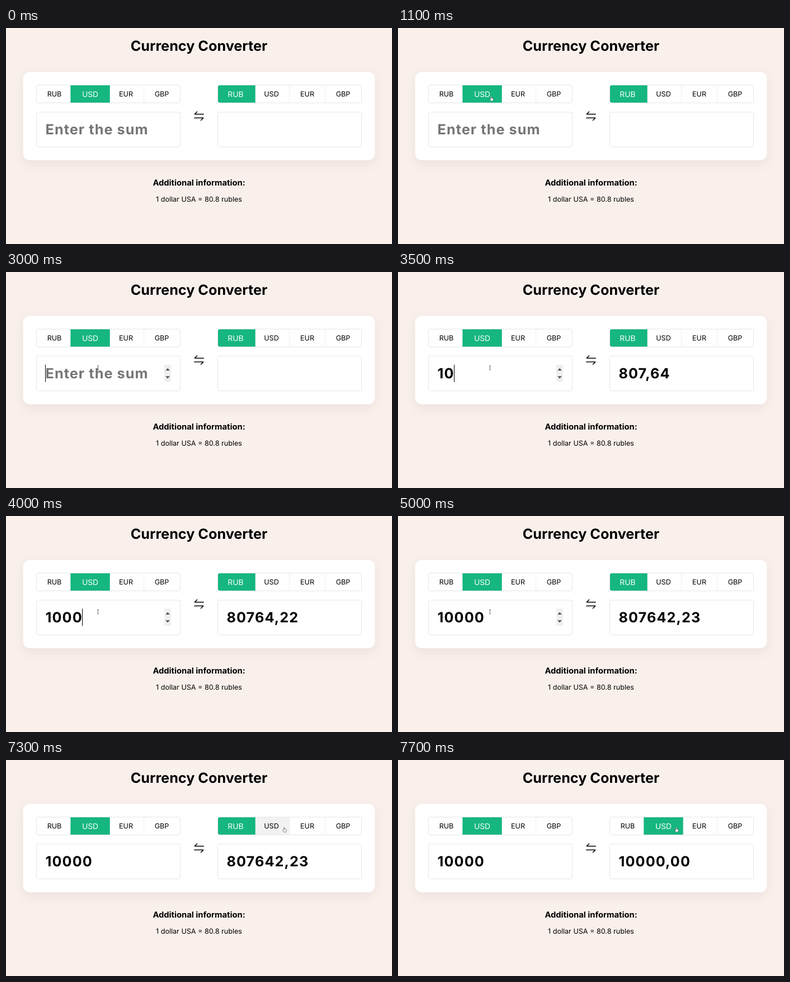
Write an HTML page with a canvas that moves like this. It is 690x388 px and loops after 8000 ms.

```html
<!DOCTYPE html>
<html lang="en">
<head>
<meta charset="utf-8">
<title>Currency Converter</title>
<style>
  html, body { margin: 0; width: 100%; height: 100%; overflow: hidden; background: #f9f0ec; }
  canvas { display: block; width: 690px; height: 388px; }
</style>
</head>
<body>
<canvas id="stage"></canvas>
<script>
const W = 690, H = 388, LOOP = 8000, STEP = 100;
const canvas = document.getElementById('stage');
const ctx = canvas.getContext('2d');
const ratio = window.devicePixelRatio || 1;
canvas.width = W * ratio;
canvas.height = H * ratio;

const GREEN = '#16b67f', BORDER = '#e6e6e6', DIVIDER = '#eeeeee';
const CODES = ['RUB', 'USD', 'EUR', 'GBP'];
const PANEL_W = 257, TAB_W = 64, TAB_Y = 102.5, TAB_H = 32;
const FIELD_Y = 151, FIELD_H = 62.5;
const LEFT = 54.5, RIGHT = 378.5;
const BODY = 12.6, BIG = 25.2, SUM_SPACING = 1.1, SUM_PAD = 16;
const CLICK = 7300;

// time, typed sum, converted sum
const ENTRIES = [
  [0, '', ''],
  [3100, '1', '80,76'],
  [3500, '10', '807,64'],
  [3700, '100', '8076,42'],
  [4000, '1000', '80764,22'],
  [4500, '10000', '807642,23'],
  [7400, '10000', '10000,00']
];

// time, x, y of the pointer
const PATH = [
  [300, 172.5, 106.5], [1000, 172.5, 106.5], [1100, 167.2, 126.8], [1300, 164, 147],
  [1600, 162, 178], [1800, 162, 178], [2200, 164.5, 172], [5400, 164.5, 172],
  [5700, 161, 164.5], [5900, 161, 164.5], [6600, 490, 124], [6800, 490, 124],
  [7200, 498, 125]
];

const clamp = v => Math.max(0, Math.min(1, v));
const smooth = v => v * v * (3 - 2 * v);

function box(x, y, w, h, r) {
  ctx.beginPath();
  ctx.roundRect(x, y, w, h, r);
}

function poly(points, close) {
  ctx.beginPath();
  points.forEach(([x, y]) => ctx.lineTo(x, y));
  if (close) ctx.closePath();
}

function setFont(size, weight, spacing = 0) {
  ctx.font = `${weight} ${size}px Inter, sans-serif`;
  ctx.letterSpacing = spacing + 'px';
}

function write(str, x, y, size, weight, color) {
  setFont(size, weight);
  ctx.textAlign = 'center';
  ctx.fillStyle = color;
  ctx.fillText(str, x, y);
}

function writeSum(str, x, color) {
  setFont(BIG, 700, SUM_SPACING);
  ctx.textAlign = 'left';
  ctx.fillStyle = color;
  ctx.fillText(str, x + SUM_PAD, 191.2);
}

function pointerAt(t) {
  if (t < PATH[0][0]) return null;
  const i = PATH.findIndex(p => p[0] > t);
  if (i < 0) return PATH[PATH.length - 1].slice(1);
  const [t0, x0, y0] = PATH[i - 1], [t1, x1, y1] = PATH[i];
  const k = (t - t0) / (t1 - t0);
  return [x0 + (x1 - x0) * k, y0 + (y1 - y0) * k];
}

function inside(p, x, y, w, h) {
  return !!p && p[0] >= x && p[0] < x + w && p[1] >= y && p[1] < y + h;
}

function drawCard() {
  ctx.fillStyle = '#f9f0ec';
  ctx.fillRect(0, 0, W, H);
  ctx.save();
  ctx.shadowColor = 'rgba(90, 50, 30, 0.08)';
  ctx.shadowBlur = 20 * ratio;
  ctx.shadowOffsetY = 6 * ratio;
  ctx.fillStyle = '#fff';
  box(30.5, 79, 629, 158.5, 12);
  ctx.fill();
  ctx.restore();
}

// levels: how far each tab is selected, 0 to 1
function drawTabs(x, levels, pointer) {
  ctx.strokeStyle = BORDER;
  ctx.lineWidth = 1;
  box(x, TAB_Y, PANEL_W, TAB_H, 3.5);
  ctx.stroke();

  ctx.save();
  box(x + 0.5, TAB_Y + 0.5, PANEL_W - 1, TAB_H - 1, 3);
  ctx.clip();
  const order = [0, 1, 2, 3].sort((a, b) => levels[a] - levels[b]);
  for (const i of order) {
    const left = x + i * TAB_W, level = levels[i];
    if (i) {
      ctx.fillStyle = DIVIDER;
      ctx.fillRect(left - 0.5, TAB_Y, 1, TAB_H);
    }
    ctx.save();
    ctx.translate(left + TAB_W / 2, TAB_Y + TAB_H / 2);
    ctx.scale(1 + level * 0.1, 1 + level * 0.1);
    if (inside(pointer, left, TAB_Y, TAB_W, TAB_H) && level < 1) {
      ctx.fillStyle = '#f2f2f2';
      ctx.fillRect(-TAB_W / 2, -TAB_H / 2, TAB_W, TAB_H);
    }
    ctx.globalAlpha = level;
    ctx.fillStyle = GREEN;
    ctx.fillRect(-TAB_W / 2, -TAB_H / 2, TAB_W, TAB_H);
    ctx.globalAlpha = 1;
    const c = Math.round(255 * level);
    write(CODES[i], 0, 4.8, BODY, 400, `rgb(${c}, ${c}, ${c})`);
    ctx.restore();
  }
  ctx.restore();
}

function drawField(x) {
  ctx.strokeStyle = BORDER;
  ctx.lineWidth = 1;
  box(x, FIELD_Y, PANEL_W, FIELD_H, 3.5);
  ctx.stroke();
}

function drawSpinner() {
  ctx.fillStyle = '#efefef';
  ctx.fillRect(283, 166.5, 12, 30.5);
  ctx.fillStyle = '#505050';
  poly([[285.2, 177], [289, 172.8], [292.8, 177]], true);
  ctx.fill();
  poly([[285.2, 187.3], [289, 191.5], [292.8, 187.3]], true);
  ctx.fill();
}

function drawSwap() {
  ctx.strokeStyle = '#000';
  ctx.lineWidth = 1.6;
  ctx.lineJoin = 'round';
  poly([[353.8, 154.7], [337.3, 154.7], [342, 150]]);
  ctx.stroke();
  poly([[336.3, 161.5], [352.8, 161.5], [348.1, 166.2]]);
  ctx.stroke();
}

function caretOn(t) {
  if (t < 1700 || t >= CLICK) return false;
  const typed = ENTRIES.filter(e => e[0] <= t && e[0] > 0).pop();
  const start = typed ? typed[0] : 1700;
  return Math.floor((t - start) / 500) % 2 === 0;
}

function drawCaret(str) {
  setFont(BIG, 700, SUM_SPACING);
  const x = LEFT + SUM_PAD + (str ? ctx.measureText(str).width : 0);
  ctx.fillStyle = '#000';
  ctx.fillRect(Math.floor(x), 166.5, 1, 31);
}

function drawBeam() {
  ctx.strokeStyle = '#555';
  ctx.lineWidth = 0.8;
  poly([[0, -3.4], [0, 3.4]]);
  ctx.stroke();
  for (const y of [-3.7, 3.7]) {
    poly([[-1.5, y], [1.5, y]]);
    ctx.stroke();
  }
}

function drawHand() {
  ctx.beginPath();
  ctx.moveTo(-1.5, 0.8);
  ctx.lineTo(-1.5, -3.4);
  ctx.quadraticCurveTo(-0.7, -5, 0.1, -3.4);
  ctx.lineTo(0.1, -0.9);
  ctx.lineTo(2.4, -0.5);
  ctx.quadraticCurveTo(3.4, -0.3, 3.3, 0.9);
  ctx.lineTo(2.4, 4.4);
  ctx.lineTo(-1.3, 4.4);
  ctx.lineTo(-3.4, 1.3);
  ctx.quadraticCurveTo(-3.2, 0, -1.5, 1.2);
  ctx.closePath();
  ctx.fillStyle = '#fff';
  ctx.fill();
  ctx.strokeStyle = '#333';
  ctx.lineWidth = 0.6;
  ctx.stroke();
}

function drawArrow() {
  poly([[-2, -4], [-2, 3.6], [-0.4, 2.2], [0.7, 4.7], [1.8, 4.2], [0.8, 1.9], [3, 1.8]], true);
  ctx.fillStyle = '#000';
  ctx.fill();
  ctx.strokeStyle = '#fff';
  ctx.lineWidth = 0.6;
  ctx.stroke();
}

function drawPointer(pointer, overField) {
  const overTabs = [LEFT, RIGHT].some(x => inside(pointer, x, TAB_Y, PANEL_W, TAB_H));
  ctx.save();
  ctx.translate(...pointer);
  if (overField) drawBeam();
  else if (overTabs) drawHand();
  else drawArrow();
  ctx.restore();
}

function draw(t) {
  const pointer = pointerAt(t);
  const overField = inside(pointer, LEFT, FIELD_Y, PANEL_W, FIELD_H);
  const [, sum, result] = ENTRIES.filter(e => e[0] <= t).pop();
  const picked = smooth(clamp((t - CLICK) / 300));

  ctx.setTransform(ratio, 0, 0, ratio, 0, 0);
  ctx.textRendering = 'geometricPrecision';
  drawCard();
  write('Currency Converter', 345, 41.4, BIG, 700, '#000');
  drawTabs(LEFT, [0, 1, 0, 0], pointer);
  drawTabs(RIGHT, [1 - picked, picked, 0, 0], pointer);
  drawField(LEFT);
  drawField(RIGHT);
  drawSwap();

  if (overField) drawSpinner();
  writeSum(sum || 'Enter the sum', LEFT, sum ? '#000' : '#757575');
  writeSum(result, RIGHT, '#000');
  if (caretOn(t)) drawCaret(sum);

  write('Additional information:', 345, 283.4, 14.74, 700, '#000');
  write('1 dollar USA = 80.8 rubles', 345, 311.7, BODY, 400, '#000');
  if (pointer) drawPointer(pointer, overField);
}

const begin = performance.now();
function tick() {
  const t = (performance.now() - begin) % LOOP;
  draw(Math.floor(t / STEP) * STEP);
  requestAnimationFrame(tick);
}
tick();
</script>
</body>
</html>
```
